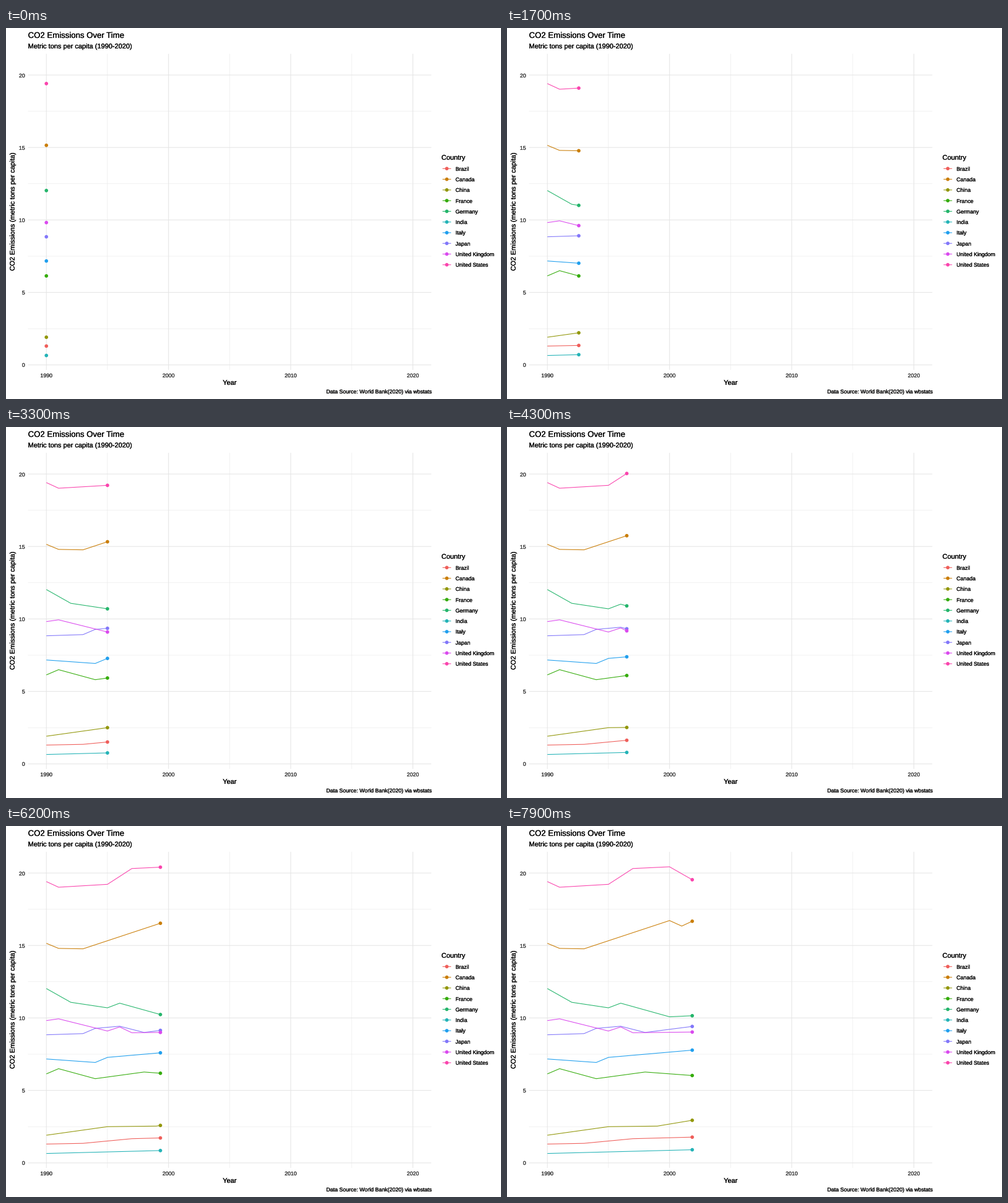
Animation of 800x600 px, one loop 8 s. Source, as a matplotlib script:

```python
import numpy as np
import matplotlib.pyplot as plt
from matplotlib.animation import FuncAnimation
from matplotlib.patches import Circle
from matplotlib.patheffects import Normal, Stroke

plt.rcParams["font.family"] = "Liberation Sans"

W, H, DPI = 800, 600, 100
PT = 72 / DPI                      # points per pixel
LEFT, RIGHT, TOP, BOTTOM = 35.6, 687.3, 41.8, 552.9
RADIUS, STROKE = 2.85, 1.07
FRAMES, INTERVAL = 80, 100
GREY, GRID = "#3C3C3C", "#E6E6E6"

# country: (colour, turning points as (years since 1990, tons))
SERIES = {
    "Brazil": ("#EF5E5A", [(0, 1.3), (3, 1.35), (7, 1.67), (12, 1.78)]),
    "Canada": ("#CA7E08", [(0, 15.15), (1, 14.8), (3, 14.77), (10, 16.72),
                           (11, 16.34), (12, 16.73)]),
    "China": ("#92970A", [(0, 1.91), (5, 2.5), (9, 2.54), (12, 2.96)]),
    "France": ("#35AC0C", [(0, 6.14), (1, 6.5), (4, 5.81), (8, 6.27),
                           (12, 6.02)]),
    "Germany": ("#24B56B", [(0, 12.03), (2, 11.08), (5, 10.7), (6, 11.02),
                            (10, 10.08), (12, 10.16)]),
    "India": ("#24B3B7", [(0, 0.65), (12, 0.91)]),
    "Italy": ("#209FEE", [(0, 7.17), (4, 6.93), (5, 7.28), (12, 7.79)]),
    "Japan": ("#8277FA", [(0, 8.84), (3, 8.92), (4, 9.28), (6, 9.43),
                          (8, 9), (12, 9.43)]),
    "United Kingdom": ("#DA4AEE", [(0, 9.82), (1, 9.94), (5, 9.1), (6, 9.38),
                                   (7, 8.98), (12, 9.03)]),
    "United States": ("#FA44AD", [(0, 19.41), (1, 19.02), (5, 19.22),
                                  (7, 20.31), (10, 20.43), (12, 19.47)]),
}
YEARS = np.arange(13)
# each year is reached on a whole frame of a 200-frame, 30-year reveal
KEYS = np.round(YEARS * 199 / 30)


def px(year):
    return 65.22 + 19.745 * np.asarray(year)


def py(tons):
    return 544.85 - 23.44 * np.asarray(tons)


fig = plt.figure(figsize=(W / DPI, H / DPI), dpi=DPI, facecolor="white")
ax = fig.add_axes([0, 0, 1, 1])
ax.set_xlim(0, W)
ax.set_ylim(H, 0)
ax.axis("off")


def line(xs, ys, color, width=STROKE, z=2):
    return ax.plot(xs, ys, color=color, lw=width * PT, zorder=z, snap=False,
                   solid_capstyle="butt", solid_joinstyle="round")[0]


def dot(x, y, color):
    return ax.add_patch(Circle((x, y), RADIUS, fc=color, lw=0, zorder=3))


def label(x, y, s, size, ha="left", color="black", rotation=0):
    # outlined glyphs keep sub-pixel spacing; the hairline adds a little weight
    effects = [Stroke(linewidth=0.2 * PT, foreground=color), Normal()]
    ax.text(x, np.round(y), s, fontsize=size * PT, ha=ha, va="baseline",
            color=color, rotation=rotation, rotation_mode="anchor",
            path_effects=effects)


def grid(years, tons, width, z):
    for t in tons:
        line([LEFT, RIGHT], [py(t)] * 2, GRID, width, z)
    for yr in years:
        line([px(yr)] * 2, [TOP, BOTTOM], GRID, width, z)


grid(range(5, 30, 10), np.arange(2.5, 20, 5), STROKE / 2, 0)
grid(range(0, 31, 10), range(0, 21, 5), STROKE, 1)

for t in range(0, 21, 5):
    label(30.7, py(t) + 3.6, str(t), 8.8, "right", GREY)
for yr in range(0, 31, 10):
    label(px(yr), 565, str(1990 + yr), 8.8, "center", GREY)

label(LEFT, 16, "CO2 Emissions Over Time", 13.2)
label(LEFT, 33, "Metric tons per capita (1990-2020)", 11)
label((LEFT + RIGHT) / 2, 577, "Year", 11, "center")
label(13.8, (TOP + BOTTOM) / 2, "CO2 Emissions (metric tons per capita)", 11,
      "center", rotation=90)
label(RIGHT, 591, "Data Source: World Bank(2020) via wbstats", 8.8, "right")

label(703.7, 213, "Country", 11)
for i, (name, (color, _)) in enumerate(SERIES.items()):
    y = 227.35 + 17.28 * i
    line([705.5, 719.3], [y, y], color)
    dot(712.4, y, color)
    label(726.4, y + 3.4, name, 8.8)

tracks = [(line([], [], color), dot(0, 0, color), np.transpose(points))
          for color, points in SERIES.values()]


def update(frame):
    now = np.interp(frame, KEYS, YEARS)
    for path, head, (years, tons) in tracks:
        xs = np.append(years[years < now], now)
        ys = np.interp(xs, years, tons)
        path.set_data(px(xs), py(ys))
        head.center = px(now), py(ys[-1])
    return [a for track in tracks for a in track[:2]]


anim = FuncAnimation(fig, update, frames=FRAMES, interval=INTERVAL,
                     repeat=True, repeat_delay=0, blit=False)
plt.show()
```
